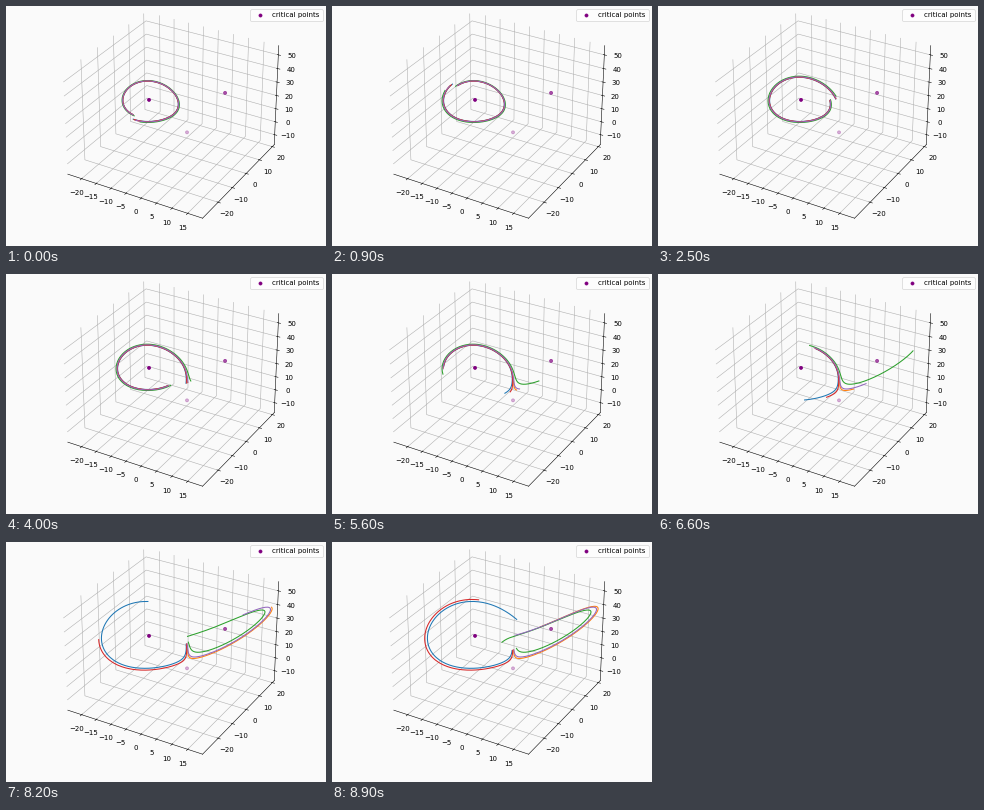
Recreate the animation shown at these times as a matplotlib script. Size 320 by 240 pixels, loop 9000 ms.

```python
import numpy as np
import matplotlib.pyplot as plt
from matplotlib.animation import FuncAnimation

W, H = 320, 240
FRAMES, INTERVAL = 90, 100
TRAIL = 50       # length of the visible trail, in frames
FINE = 4         # curve samples per frame
LAP = 50.5       # frames for one lap of the left lobe
PEAK = 11        # frame at which the last lap reaches its top
GATE = 52        # frame at which the trajectories part near the saddle
BG = "#fafafa"

SIGMA, RHO, BETA = 10, 28, 8 / 3
STEP = 0.0025    # integration step

# x of each trajectory at the gate; the sign decides the lobe it falls into
GATE_X = {"tab:blue": -0.82, "tab:orange": 0.34, "tab:green": 2.7,
          "tab:red": -0.29, "tab:purple": 0.65}


def lorenz(p):
    x, y, z = p
    return np.array([SIGMA * (y - x), x * (RHO - z) - y, x * y - BETA * z])


def orbit(s, t_end):
    """Runge-Kutta orbits starting at (s, s, 24), shape (time, xyz, start)."""
    s = np.atleast_1d(s)
    p = np.array([s, s, np.full_like(s, 24.0)])
    out = [p]
    for _ in range(round(t_end / STEP)):
        k1 = lorenz(p)
        k2 = lorenz(p + STEP / 2 * k1)
        k3 = lorenz(p + STEP / 2 * k2)
        k4 = lorenz(p + STEP * k3)
        p = p + STEP / 6 * (k1 + 2 * k2 + 2 * k3 + k4)
        out.append(p)
    return np.array(out)


def aim(t_gate, goal):
    """Start value whose orbit has x = goal at t_gate, by repeated zooming."""
    lo, hi = -5.0, -1.0
    for _ in range(6):
        s = np.linspace(lo, hi, 60)
        i = max(1, np.argmax(orbit(s, t_gate)[-1, 0] > goal))
        lo, hi = s[i - 1], s[i]
    return (lo + hi) / 2


# An orbit that runs into the saddle sets the clock: two laps, then the gate.
z = orbit(aim(1.72, 0), 1.72)[:, 2, 0]
tops = np.flatnonzero((z[1:-1] > z[:-2]) & (z[1:-1] > z[2:])) + 1
t_first, t_last = tops[:2] * STEP
dt = (t_last - t_first) / LAP


def frame_time(frame):
    return t_last + (frame - PEAK) * dt


def make_path(goal):
    """Finely sampled xyz from the first trail's tail to the last head."""
    start = aim(frame_time(GATE), goal)
    pts = orbit(start, frame_time(FRAMES))[:, :, 0]
    t = np.arange(len(pts)) * STEP
    wanted = frame_time(np.arange(-TRAIL * FINE, FRAMES * FINE) / FINE)
    return np.array([np.interp(wanted, t, axis) for axis in pts.T])


fig = plt.figure(figsize=(W / 50, H / 50), dpi=50, facecolor=BG)
ax = fig.add_axes([43.66 / W, 12.66 / H, H / W, 1], projection="3d")
ax.patch.set_visible(False)
ax.view_init(elev=30, azim=-60)

paths = [make_path(goal) for goal in GATE_X.values()]
lines = [ax.plot([], [], [], color=color)[0] for color in GATE_X]

c = np.sqrt(BETA * (RHO - 1))
ax.scatter([0, c, -c], [0, c, -c], [0, RHO - 1, RHO - 1],
           color="purple", label="critical points")

ax.set(xlim=(-24.8, 19.7), ylim=(-30.5, 21.5), zlim=(-17.8, 56.7))
ax.set_xticks(range(-20, 16, 5))
ax.set_yticks(range(-20, 21, 10))
ax.set_zticks(range(-10, 51, 10))
for axis in (ax.xaxis, ax.yaxis, ax.zaxis):
    axis.set_pane_color((1, 1, 1, 0))
fig.legend(loc="upper right")


def update(frame):
    tail = frame * FINE
    for line, path in zip(lines, paths):
        line.set_data_3d(*path[:, tail:tail + TRAIL * FINE + 1])
    return lines


anim = FuncAnimation(fig, update, frames=FRAMES, interval=INTERVAL,
                     repeat=True, repeat_delay=0, blit=False)
plt.show()
```
